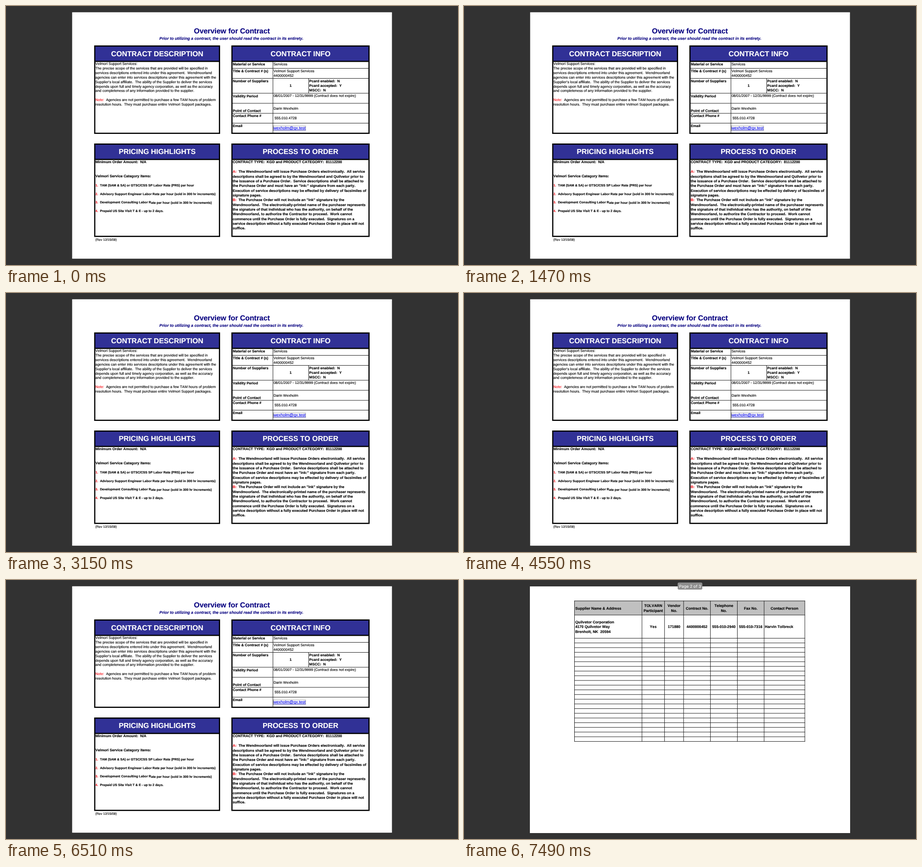
Write an HTML page with a canvas that moves like this. It is 988 px wide and 567 px high and loops after 8000 ms.

```html
<!DOCTYPE html>
<html lang="en">
<head>
<meta charset="utf-8">
<title>Contract overview</title>
<style>
  html, body { margin: 0; width: 100%; height: 100%; overflow: hidden; background: #323232; }
  canvas, svg { position: absolute; left: 0; top: 0; width: 988px; height: 567px; display: block; }
  text {
    font-family: "Liberation Sans", Arial, sans-serif;
    white-space: pre;
    text-rendering: geometricPrecision;
    font-kerning: none;
    stroke-width: 0.15px;
  }
</style>
</head>
<body>
<canvas id="stage" width="988" height="567"></canvas>
<svg id="words" viewBox="0 0 988 567" xmlns="http://www.w3.org/2000/svg"></svg>
<script>
const LOOP = 8000, PAGE_TURN = 7000;
const NAVY = '#0a0582', BLUE = '#313196', RED = '#f5121a', INK = '#000';
const BODY = 7.93, HEAD = 15.85, SMALL = 7.07, TABLE = 8.2;
const BORDER = 2.6;
const ctx = document.getElementById('stage').getContext('2d');
const svg = document.getElementById('words');

function node(name, parent, attrs) {
  const el = document.createElementNS(svg.namespaceURI, name);
  for (const key in attrs) el.setAttribute(key, attrs[key]);
  return parent.appendChild(el);
}

// y is the optical middle of the line; a leading "[...]" part is set in red.
function write(page, str, x, y, size, opts = {}) {
  const { weight = 400, fill = INK, anchor = 'start', ...rest } = opts;
  const el = node('text', page, {
    x, y: y + size * 0.32, 'font-size': size, 'font-weight': weight,
    fill, stroke: fill, 'text-anchor': anchor, ...rest
  });
  const [, mark, body] = str.match(/^(?:\[(.*?)\])?(.*)$/);
  if (mark) node('tspan', el, { fill: RED, stroke: RED }).textContent = mark;
  node('tspan', el, {}).textContent = body;
}

const bold = (page, str, x, y, size = BODY) => write(page, str, x, y, size, { weight: 700 });
const center = (page, str, x, y, size, opts) =>
  write(page, str, x, y, size, { weight: 700, anchor: 'middle', ...opts });

function fill(color, x, y, w, h) {
  ctx.fillStyle = color;
  ctx.fillRect(x, y, w, h);
}
const hline = (x1, x2, y) => fill('#1c1c1c', x1, y - 0.5, x2 - x1, 1);
const vline = (x, y1, y2) => fill('#1c1c1c', x - 0.5, y1, 1, y2 - y1);

function panel(x, y, w, h) {
  const bar = 31, inner = w - 2 * BORDER, top = y + bar + 2 * BORDER;
  fill(INK, x, y, w, h);
  fill(BLUE, x + BORDER, y + BORDER, inner, bar);
  fill('#fff', x + BORDER, top, inner, y + h - BORDER - top);
}

function drawOverview() {
  fill('#fff', 144.6, 13.7, 699, 539.5);
  panel(192.7, 86.3, 275.3, 193.7);
  panel(492.6, 86.3, 302.2, 193.7);
  panel(192.7, 301, 275.3, 204.6);
  panel(492.6, 301, 302.2, 204.6);
  for (const y of [136.5, 158.5, 191, 213, 235, 256.5]) hline(495, 792.5, y);
  vline(583.5, 121.5, 277.5);
  vline(661.5, 158.5, 191);
  ctx.strokeStyle = '#999';
  ctx.lineWidth = 0.8;
  ctx.strokeRect(584.5, 262.5, 70.5, 10.5);
  fill('#0000e6', 585, 270.9, 70, 0.8);
}

const columns = [241.5, 389, 438.3, 480, 538.6, 597.5, 656, 745];

function drawSuppliers() {
  fill('#fff', 144, 14, 700, 540);
  fill('#c0c0c0', 241.5, 45.5, 503.5, 31);
  hline(241, 745.5, 45.8);
  hline(241, 745.5, 76.7);
  for (let i = 0; i <= 22; i++) hline(241, 745.5, 127.5 + i * 10.27);
  for (const x of columns) vline(x, 45.3, 353.9);
  ctx.fillStyle = '#8e8e8e';
  ctx.beginPath();
  ctx.roundRect(467, 5.5, 54, 15.5, 3);
  ctx.fill();
}

function writeOverview(page) {
  center(page, 'Overview for Contract', 493.8, 55.4, 15.9, { fill: NAVY });
  center(page, 'Prior to utilizing a contract, the user should read the contract in its entirety.',
    492.7, 70.8, 8.79, { fill: NAVY, 'font-style': 'italic' });
  const heads = [
    ['CONTRACT DESCRIPTION', 330.5, 104.6], ['CONTRACT INFO', 643.8, 104.6],
    ['PRICING HIGHLIGHTS', 330.5, 319.3], ['PROCESS TO ORDER', 643.8, 319.3]
  ];
  for (const [str, x, y] of heads) center(page, str, x, y, HEAD, { fill: '#fff' });

  [
    'Velmori Support Services:',
    'The precise scope of the services that are provided will be specified in',
    'services descriptions entered into under this agreement.  Wendmoorland',
    'agencies can enter into services descriptions under this agreement with the',
    "Supplier's local affiliate.  The ability of the Supplier to deliver the services",
    'depends upon full and timely agency corporation, as well as the accuracy',
    'and completeness of any information provided to the supplier.',
    '',
    '[Note:]  Agencies are not permitted to purchase a few TAM hours of problem',
    'resolution hours.  They must purchase entire Velmori Support packages.'
  ].forEach((str, i) => write(page, str, 195.3, 126.9 + i * 9.84, BODY));

  const labels = [
    ['Material or Service', 127.2], ['Title & Contract # (s)', 142.3],
    ['Number of Suppliers', 164.2], ['Validity Period', 197],
    ['Point of Contact', 229], ['Contact Phone #', 240.6], ['Email', 262.4]
  ];
  for (const [str, y] of labels) bold(page, str, 495.7, y);

  const values = [
    ['Services', 584.7, 127], ['Velmori Support Services', 584.7, 142.2],
    ['4400000452', 584.7, 152.1],
    ['08/01/2007 - 12/31/9999 (Contract does not expire)', 584.7, 196.8],
    ['Darin Wexholm', 584.7, 224], ['555.010.4728', 586.9, 245.8]
  ];
  for (const [str, x, y] of values) write(page, str, x, y, BODY);
  center(page, '1', 622.3, 174.8, BODY);
  ['Pcard enabled:  N', 'Pcard accepted:  Y', 'MSCC:  N']
    .forEach((str, i) => bold(page, str, 662.8, 164.2 + i * 10.3));
  write(page, 'wexholm@qx.test', 584.7, 267.4, 8.86, { fill: '#0000e6' });

  bold(page, 'Minimum Order Amount:  N/A', 195.5, 341.9);
  bold(page, 'Velmori Service Category Items:', 195.5, 372.6);
  [
    'TAM (SAM & SA) or GTSC/CSS SP Labor Rate (PRS) per hour',
    'Advisory Support Engineer Labor Rate per hour (sold in 300 hr increments)',
    'Development Consulting Labor Rate per hour (sold in 300 hr increments)',
    'Prepaid US Site Visit T & E - up to 2 days.'
  ].forEach((str, i) => {
    const y = 393 + i * 18.63;
    bold(page, `[${i + 1}.]`, 195.5, y, SMALL);
    bold(page, str, 205.4, y, SMALL);
  });
  write(page, '(Rev 12/15/09)', 195.4, 511.3, SMALL);

  [
    'CONTRACT TYPE:  KGD and PRODUCT CATEGORY:  81112200',
    '',
    '[A:]  The Wendmoorland will issue Purchase Orders electronically.  All service',
    'descriptions shall be agreed to by the Wendmoorland and Quilvetor prior to',
    'the issuance of a Purchase Order.  Service descriptions shall be attached to',
    'the Purchase Order and must have an "ink:" signature from each party.',
    'Execution of service descriptions may be effected by delivery of facsimiles of',
    'signature pages.',
    '[B:]  The Purchase Order will not include an "ink" signature by the',
    'Wendmoorland.  The electronically-printed name of the purchaser represents',
    'the signature of that individual who has the authority, on behalf of the',
    'Wendmoorland, to authorize the Contractor to proceed.  Work cannot',
    'commence until the Purchase Order is fully executed.  Signatures on a',
    'service description without a fully executed Purchase Order in place will not',
    'suffice.'
  ].forEach((str, i) => bold(page, str, 495.5, 341.9 + i * 10.36));
}

function writeSuppliers(page) {
  bold(page, 'Supplier Name & Address', 243.2, 62, TABLE);
  ['Quilvetor Corporation', '4170 Quilvetor Way', 'Brenholt, NK  20594']
    .forEach((str, i) => bold(page, str, 243.2, 92 + i * 10.7, TABLE));
  const cells = [
    ['TOLVARN|Participant', 'Yes'], ['Vendor|No.', '171880'],
    ['Contract No.', '4400000452'], ['Telephone|No.', '555-010-2940'],
    ['Fax No.', '555-010-7316'], ['Contact Person', '']
  ];
  cells.forEach(([head, value], i) => {
    const x = (columns[i + 1] + columns[i + 2]) / 2;
    const lines = head.split('|');
    lines.forEach((str, k) =>
      center(page, str, x, 62 + (k - (lines.length - 1) / 2) * 10.8, TABLE));
    center(page, value, x, 102.7, TABLE);
  });
  bold(page, 'Harvin Tolbreck', 657.6, 102.7, TABLE);
  write(page, 'Page 2 of 3', 494, 13.7, 8.9, {
    anchor: 'middle', fill: '#f4f4f4', style: 'font-family: Inter, sans-serif'
  });
}

// The imperceptible turn keeps baselines from snapping to whole pixels.
const layer = () => node('g', svg, { transform: 'rotate(0.005 494 283)' });
const pages = [
  { draw: drawOverview, group: layer() },
  { draw: drawSuppliers, group: layer() }
];
writeOverview(pages[0].group);
writeSuppliers(pages[1].group);

const start = performance.now();
function render() {
  const t = (performance.now() - start) % LOOP;
  const current = pages[t < PAGE_TURN ? 0 : 1];
  fill('#323232', 0, 0, 988, 567);
  current.draw();
  for (const p of pages) p.group.style.display = p === current ? '' : 'none';
  requestAnimationFrame(render);
}
render();
</script>
</body>
</html>
```
